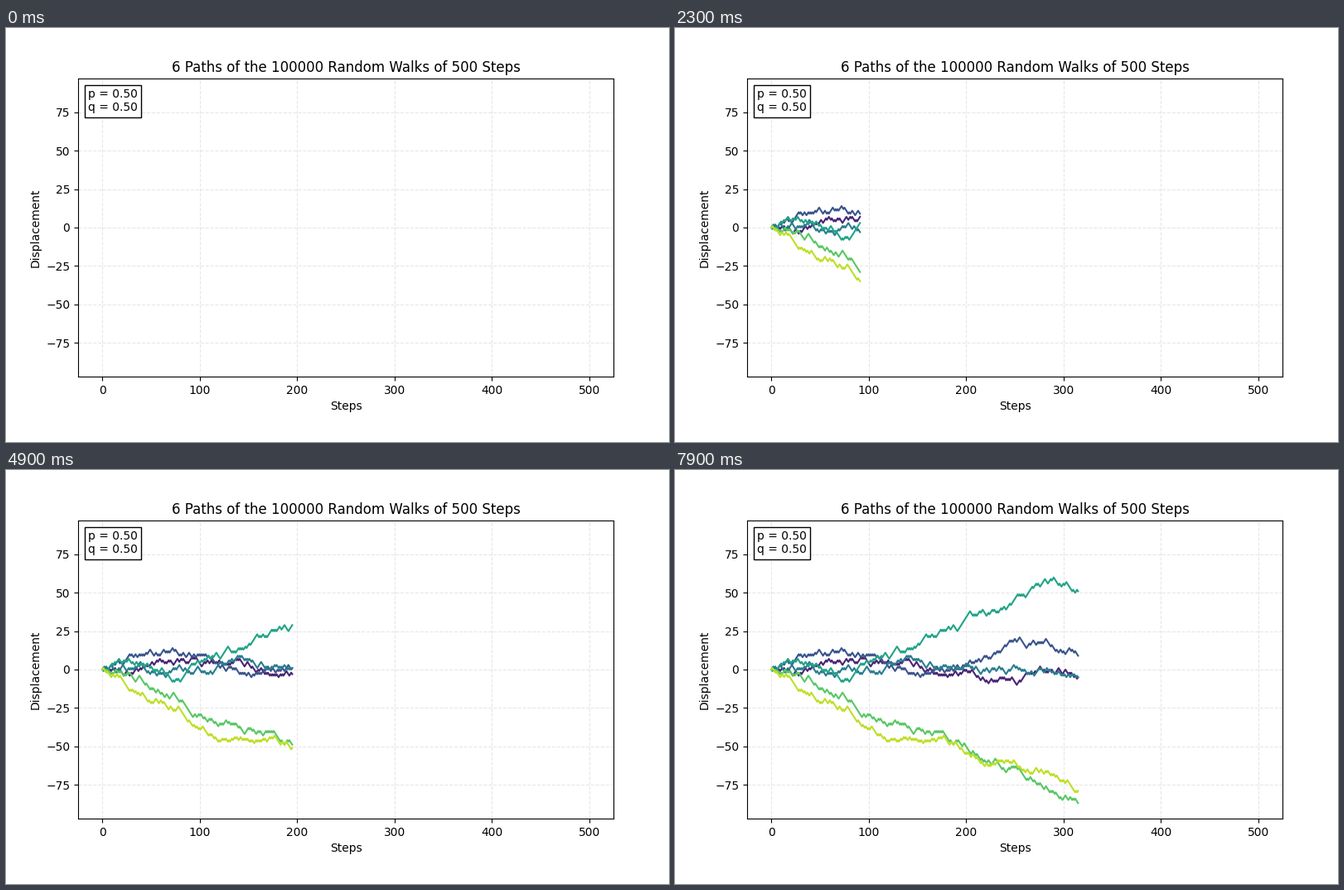
A matplotlib script that plays this animation: 800 by 500 pixels, repeating every 8 s.

```python
import numpy as np
import matplotlib.pyplot as plt
from matplotlib.animation import FuncAnimation

W, H, DPI = 800, 500, 100
FRAMES, INTERVAL = 80, 100
STEPS_PER_FRAME = 4
SPAN = 35  # steps between key heights

rng = np.random.default_rng(7)


def walk(heights):
    """Random walk of unit steps, steered through a height every SPAN steps."""
    path, sway = [0], 0
    for end in heights:
        start = path[-1]
        for left in range(SPAN - 1, -1, -1):
            pos = path[-1]
            sway = 0.8 * sway + rng.normal()
            goal = end + (start - end) * left / SPAN + sway
            if abs(end - pos) > left:
                goal = end
            path.append(pos + (1 if goal > pos else -1))
    return np.array(path)


fig = plt.figure(figsize=(W / DPI, H / DPI), dpi=DPI)
ax = fig.add_axes([87 / W, 79 / H, 646 / W, 360 / H])
ax.set(xlim=(-25, 525), ylim=(-97.1, 97.1), xlabel="Steps", ylabel="Displacement",
       title="6 Paths of the 100000 Random Walks of 500 Steps")
ax.grid(True, linestyle="--", alpha=0.3)
ax.annotate("p = 0.50\nq = 0.50", (0, 1), xycoords="axes fraction",
            xytext=(8.75, -8.75), textcoords="offset points", va="top",
            bbox=dict(boxstyle="square,pad=0.3", fc="white", ec="black"))

walks = [walk(heights) for heights in (
    (1, 6, 6, 6, -3, -4, -6, 1, -5),
    (9, 13, 8, -1, 1, 6, 18, 17, 9),
    (1, -3, 0, 7, 2, 3, -2, -2, -5),
    (5, -5, 7, 15, 25, 36, 43, 59, 51),
    (-7, -19, -31, -38, -42, -56, -66, -78, -87),
    (-14, -24, -40, -47, -45, -58, -62, -68, -79),
)]
shades = plt.cm.viridis(np.linspace(0.1, 0.9, len(walks)))
lines = [ax.plot([], [], lw=1.5, color=c)[0] for c in shades]


def update(frame):
    n = frame * STEPS_PER_FRAME
    for line, path in zip(lines, walks):
        line.set_data(np.arange(n), path[:n])
    return lines


anim = FuncAnimation(fig, update, frames=FRAMES, interval=INTERVAL,
                     repeat=True, repeat_delay=0)
plt.show()
```
